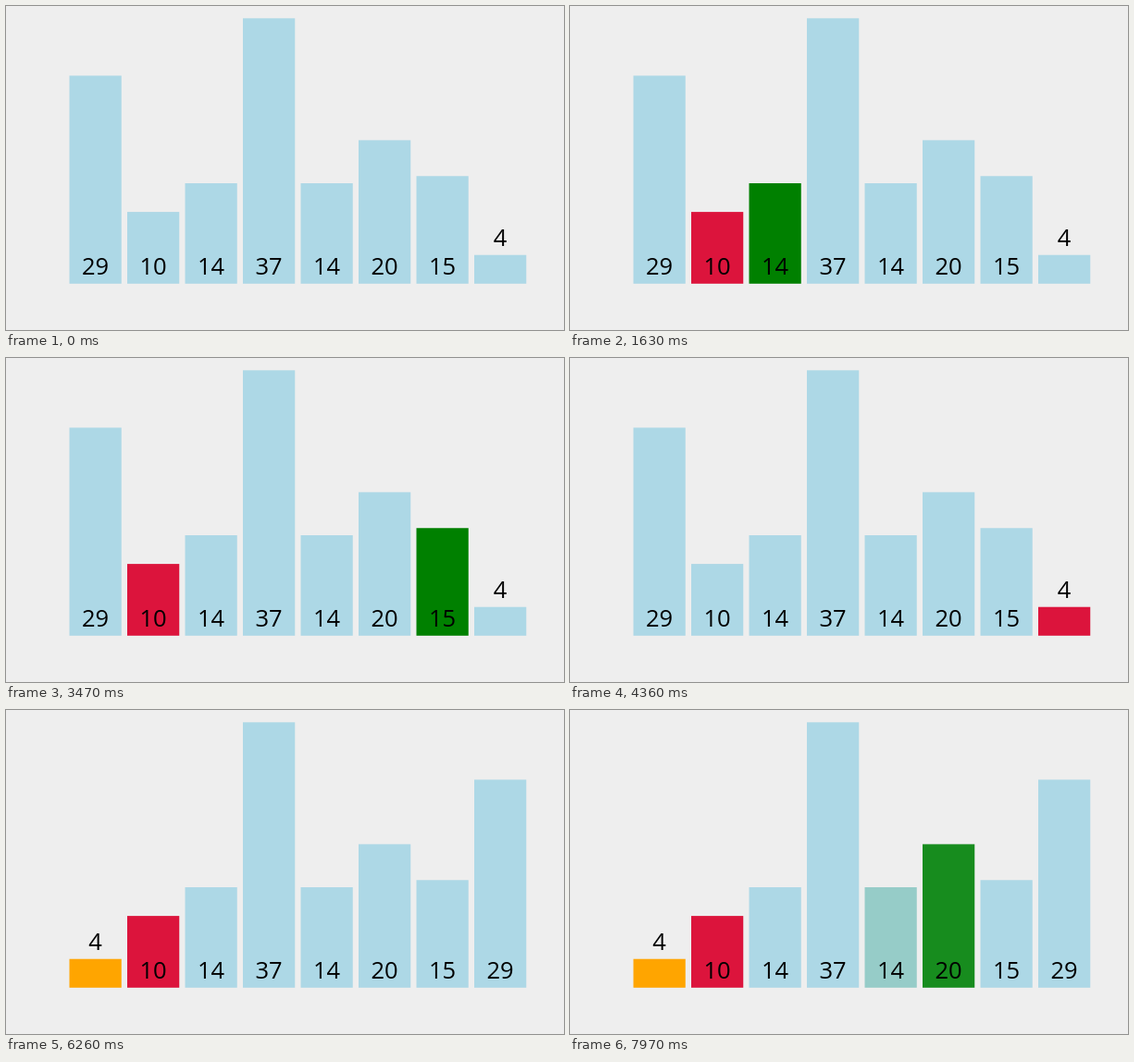
These frames come from a looping animation (603 px wide and 351 px high, 8000 ms). An HTML page:

```html
<!DOCTYPE html>
<html lang="en">
<head>
<meta charset="utf-8">
<title>Selection sort</title>
<style>
  html, body { margin: 0; width: 100%; height: 100%; overflow: hidden; background: #eee; }
  svg { display: block; width: 100%; height: 100%; }
  text { font: 25.5px "Open Sans", "Noto Sans", sans-serif; text-anchor: middle; }
</style>
</head>
<body>
<svg id="stage" viewBox="0 0 603 351"></svg>
<script>
const LOOP = 8000, TICK = 70, FADE = 250;
const LEFT = 68.5, PITCH = 62.5, WIDTH = 56.25, FLOOR = 300.8, UNIT = 7.77;
const BLUE = [173, 216, 230], RED = [220, 20, 60], GREEN = [0, 128, 0], ORANGE = [255, 165, 0];
const values = [29, 10, 14, 37, 14, 20, 15, 4];

// start and end of each step, new bar colours, time already elapsed at the start
const step = (from, to, colors, lead = 50, swap = null) => ({ from, to, colors, lead, swap });
const steps = [
  step(70, 210, { 0: RED }, 80),
  step(550, 690, { 1: GREEN }, 80),
  step(1020, 1230, { 0: BLUE, 1: RED }),
  step(1430, 1630, { 2: GREEN }),
  step(1900, 2110, { 2: BLUE, 3: GREEN }),
  step(2370, 2590, { 3: BLUE, 4: GREEN }, 73),
  step(2790, 3000, { 4: BLUE, 5: GREEN }),
  step(3260, 3470, { 5: BLUE, 6: GREEN }),
  step(3740, 3950, { 6: BLUE, 7: GREEN }),
  step(4150, 4360, { 1: BLUE, 7: RED }),
  step(4630, 4840, { 0: RED }),
  step(5110, 5320, {}, 51, [0, 7]),
  step(5580, 5790, { 0: BLUE, 7: ORANGE }),
  step(6050, 6260, { 1: RED }),
  step(6460, 6670, { 2: GREEN }),
  step(6940, 7150, { 2: BLUE, 3: GREEN }),
  step(7350, 7630, { 3: BLUE, 4: GREEN }, 20),
  step(7830, 8040, { 4: BLUE, 5: GREEN }, 30)
];

const stage = document.getElementById("stage");
function add(parent, name, attrs) {
  const node = document.createElementNS("http://www.w3.org/2000/svg", name);
  for (const key in attrs) node.setAttribute(key, attrs[key]);
  return parent.appendChild(node);
}

const bars = values.map(value => {
  const group = add(stage, "g", {});
  const height = value * UNIT;
  const rect = add(group, "rect", { y: FLOOR - height, width: WIDTH, height });
  const label = add(group, "text", { x: WIDTH / 2, y: height < 40 ? 260 : 291 });
  label.textContent = value;
  return { group, rect, label };
});

const mix = (a, b, p) => a + (b - a) * p;
const ease = t => t < 0.5 ? 4 * t ** 3 : 1 - 4 * (1 - t) ** 3;

// Progress advances in ticks, as the stage refreshes about every 70 ms.
function progress({ from, to, lead }, time) {
  const ticks = Math.round((to - from) / TICK);
  const tick = Math.floor((time - from) * ticks / (to - from) + 0.03);
  if (tick < 0) return 0;
  if (tick >= ticks) return 1;
  return ease(Math.min(1, (lead + tick * TICK) / FADE));
}

function draw(time) {
  const colors = values.map(() => BLUE);
  const slots = values.map((_, i) => i);
  const moving = new Set();
  for (const s of steps) {
    const p = progress(s, time);
    if (p === 0) break;
    for (const i in s.colors)
      colors[i] = colors[i].map((c, k) => mix(c, s.colors[i][k], p));
    if (s.swap) {
      const [a, b] = s.swap;
      [slots[a], slots[b]] = [mix(a, b, p), mix(b, a, p)];
      if (p < 1) s.swap.forEach(i => moving.add(i));
    }
  }
  bars.forEach(({ group, rect, label }, i) => {
    group.setAttribute("transform", `translate(${LEFT + PITCH * slots[i]} 0)`);
    rect.setAttribute("fill", `rgb(${colors[i].map(Math.round)})`);
    label.setAttribute("fill", moving.has(i) ? "#c8143a" : "#000");
  });
}

const begin = performance.now();
function frame() {
  draw((performance.now() - begin) % LOOP);
  requestAnimationFrame(frame);
}
draw(0);
requestAnimationFrame(frame);
</script>
</body>
</html>
```
